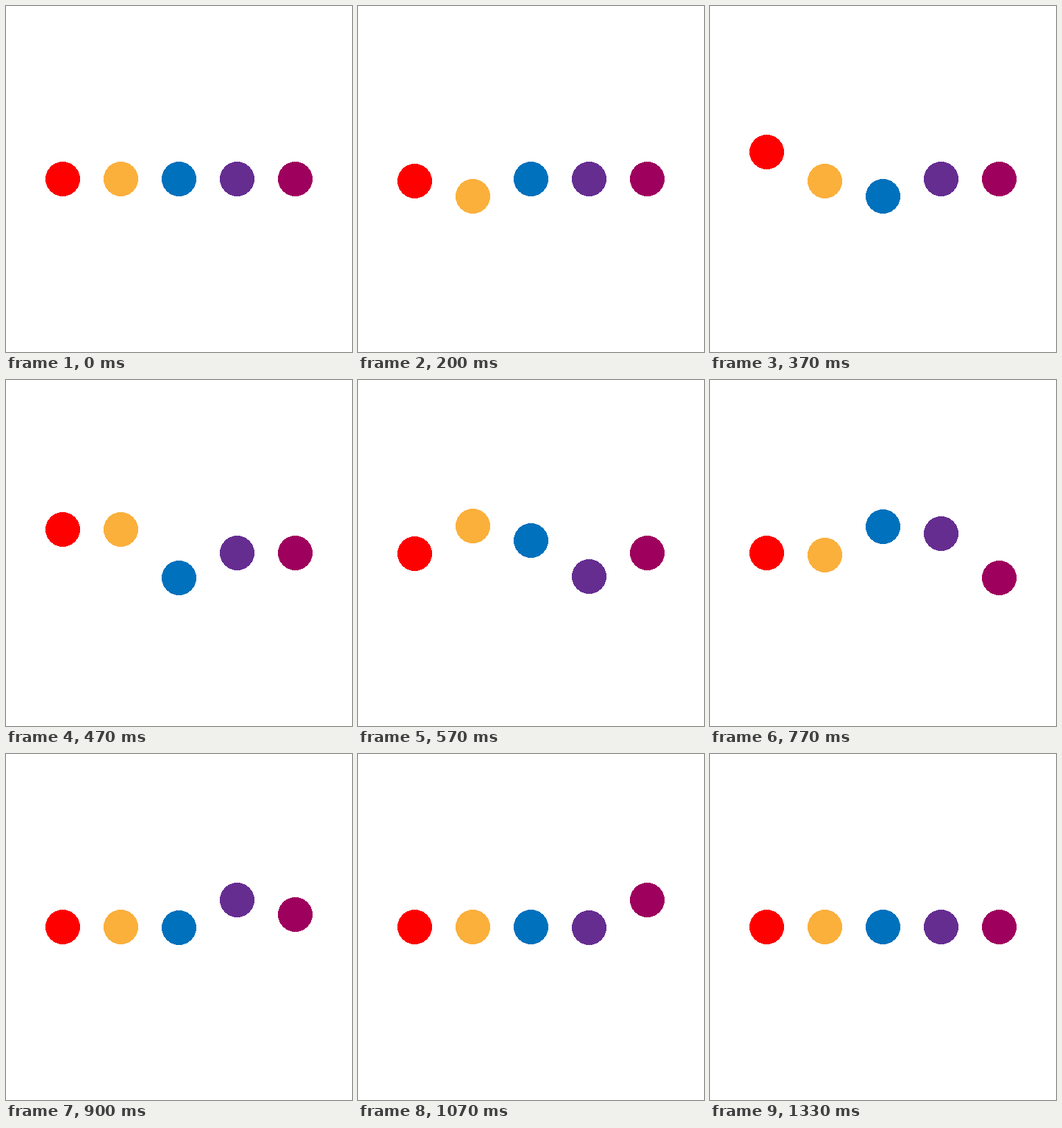
Recreate the animation shown at these times as an HTML page. Size 500 by 500 pixels, loop 1710 ms.

```html
<!DOCTYPE html>
<html lang="en">
<head>
<meta charset="utf-8">
<title>Bouncing dots</title>
<style>
  html, body { margin: 0; width: 100%; height: 100%; overflow: hidden; background: #fff; }
  svg { display: block; width: 100%; height: 100%; }
</style>
</head>
<body>
<svg id="stage" viewBox="0 0 500 500" shape-rendering="crispEdges"></svg>
<script>
const LOOP = 1710;
const LAST_STEP = 40;
const STAGGER = 5;
const REST = 250, LOW = 286, HIGH = 211;
const COLORS = ['#ff0000', '#fbb03b', '#0071bc', '#662d91', '#9e005d'];

const stage = document.getElementById('stage');
const dots = COLORS.map((fill, i) => {
  const dot = document.createElementNS('http://www.w3.org/2000/svg', 'circle');
  const attrs = { cx: 82 + 84 * i, cy: REST, r: 25, fill };
  for (const key in attrs) dot.setAttribute(key, attrs[key]);
  return stage.appendChild(dot);
});

function bezier(x1, y1, x2, y2) {
  const curve = (s, a, b) =>
    3 * (1 - s) * (1 - s) * s * a + 3 * (1 - s) * s * s * b + s * s * s;
  return x => {
    let lo = 0, hi = 1;
    for (let i = 0; i < 30; i++) {
      const mid = (lo + hi) / 2;
      if (curve(mid, x1, x2) < x) lo = mid; else hi = mid;
    }
    return curve((lo + hi) / 2, y1, y2);
  };
}

const drop = x => 1 - Math.pow(1 - x, 4);
const rise = bezier(0.34, 0, 0.05, 1);
const settle = bezier(0.58, 0, 0.332, 1.45); // overshoots the rest line
const mix = (a, b, p) => a + (b - a) * p;

function height(step) {
  if (step <= 0 || step >= 20) return REST;
  if (step < 4) return mix(REST, LOW, drop(step / 4));
  if (step < 12) return mix(LOW, HIGH, rise((step - 4) / 8));
  return mix(HIGH, REST, settle((step - 12) / 8));
}

// Three steps per 100 ms, lasting 30, 40 and 30 ms.
function stepAt(ms) {
  const rest = ms % 100;
  const step = 3 * Math.floor(ms / 100) + (rest >= 30) + (rest >= 70);
  return Math.min(step, LAST_STEP);
}

function draw(ms) {
  const step = stepAt(ms % LOOP);
  dots.forEach((dot, i) => {
    dot.setAttribute('cy', Math.round(height(step - STAGGER * i)));
  });
}

const start = performance.now();
function tick() {
  draw(performance.now() - start);
  requestAnimationFrame(tick);
}
tick();
</script>
</body>
</html>
```
